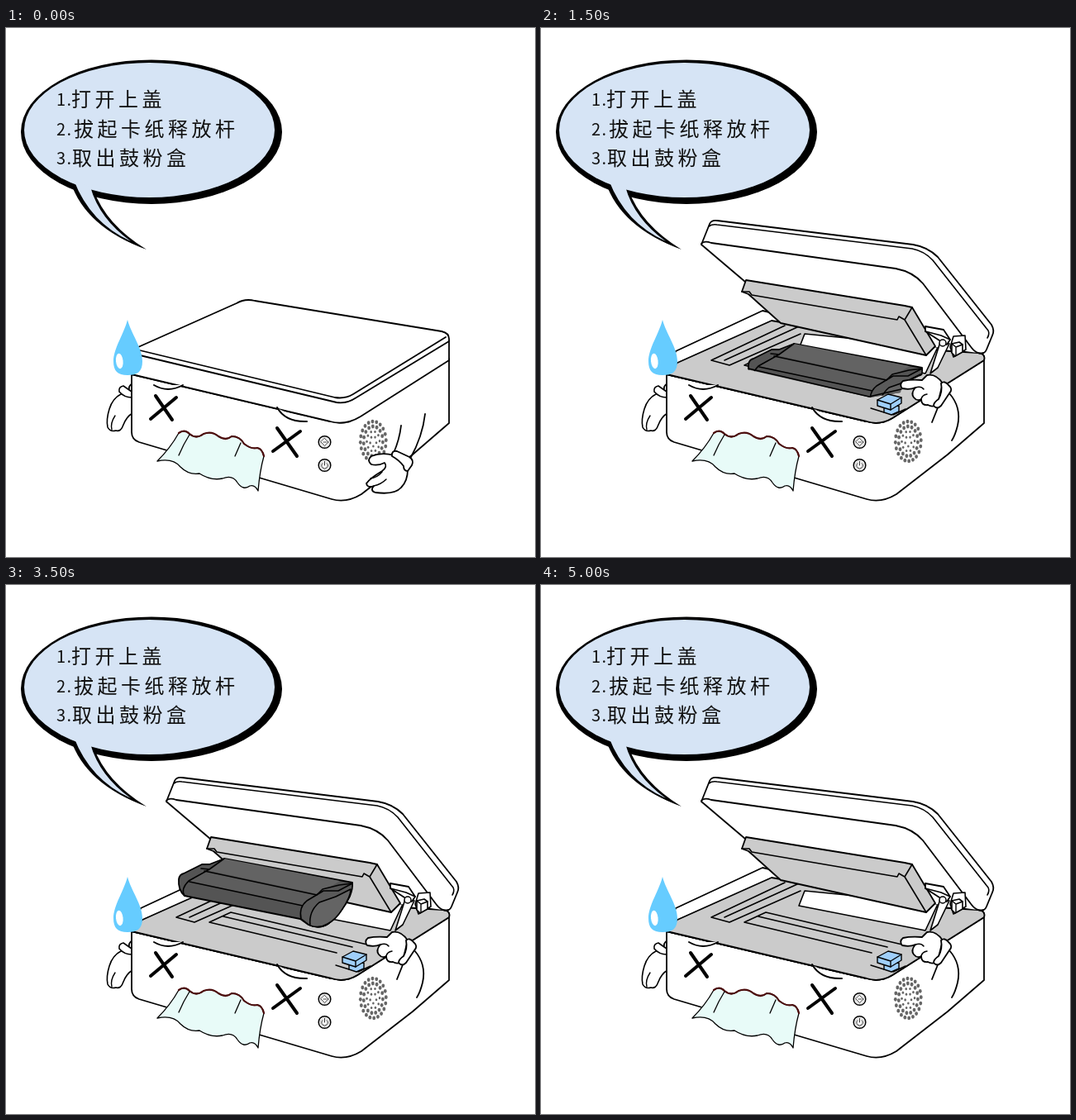
An HTML page with a canvas that plays this animation: 640x640 px, repeating every 7 s.

```html
<!DOCTYPE html>
<html lang="zh-CN">
<head>
<meta charset="utf-8">
<title>Printer help</title>
<style>
html, body { margin: 0; width: 100%; height: 100%; overflow: hidden; background: #fff; }
canvas { display: block; width: 100vw; height: 100vh; }
</style>
</head>
<body>
<canvas id="stage" width="640" height="640"></canvas>
<script>
const ctx = document.getElementById('stage').getContext('2d');
const INK = '#000', GREY = '#cbcbcb', BLUE = '#9fcffb', SKY = '#d6e4f5';
const LOOP = 7000, STEP = 500;

// Cartridge offset for each step from 3000 ms on; afterwards it is gone.
const LIFT = [[20, 24], [0, 0], [-40, -24], [-105, -51]];

function draw(d, fill, stroke = INK, width = 1.8) {
  const path = new Path2D(d);
  if (fill) { ctx.fillStyle = fill; ctx.fill(path); }
  if (stroke) { ctx.strokeStyle = stroke; ctx.lineWidth = width; ctx.stroke(path); }
}
const line = (d, width, color) => draw(d, null, color, width);

function oval(x, y, rx, ry, fill, stroke, width = 1.6, turn = 0) {
  ctx.beginPath();
  ctx.ellipse(x, y, rx, ry, turn, 0, Math.PI * 2);
  if (fill) { ctx.fillStyle = fill; ctx.fill(); }
  if (stroke) { ctx.strokeStyle = stroke; ctx.lineWidth = width; ctx.stroke(); }
}

function write(text, x, y, size, spacing) {
  ctx.font = `500 ${size}px "Noto Sans CJK SC", "Noto Sans CJK", sans-serif`;
  ctx.letterSpacing = spacing + 'px';
  ctx.fillText(text, x, y);
}

function bubble() {
  draw('M78 186Q96 241 170 268Q121 238 106 196Z', INK, null);
  oval(176, 125.7, 158, 87.3, INK);
  oval(173.5, 123.5, 151.5, 81.5, SKY);
  draw('M82 184Q102 236 151 258Q113 231 102 192Z', SKY, null);
  ctx.fillStyle = '#111';
  const rows = ['打开上盖', '拔起卡纸释放杆', '取出鼓粉盒'];
  rows.forEach((row, i) => {
    const y = 95 + i * 35.7;
    write(row, [79, 82, 80][i], y, 24, 4.5);
    write(i + 1 + '.', 61, y - 1, 20, 1.5);
  });
}

function drop() {
  draw('M147 353C151 369 165 387 165 403C165 416 159 420 147 420C135 420 130 415 130 403C130 388 143 369 147 353Z', '#66ccff', null);
  oval(137.3, 403, 4.3, 9.3, '#fff', null, 0, -0.1);
}

function leftArm() {
  line('M153 430Q148 433 149 437');
  draw('M153 466Q146 470 142 480Q139 489 133 487Q126 489 123 483Q121 474 125 461Q129 448 139 443L153 441Z', '#fff', INK, 1.6);
  draw('M137 440Q136 434 142 433L152 440V447Q143 447 137 440Z', '#fff', INK, 1.6);
  line('M132 469Q126 478 128 486', 1.4);
}

function body() {
  draw('M152 419V489Q152 498 161 501L394 570Q412 575 430 564L492 516L536 478V400L425 472Q410 481 394 476Z', '#fff');
}

function closedLid() {
  draw('M152 419L163 387L279 333Q289 327 301 330L527 367Q536 369 536 376V403L430 471Q413 481 395 477Z', '#fff', null);
  line('M152 419L392 476Q411 481 429 470L536 402');
  line('M160 386L279 333Q289 327 301 330L527 367Q536 369 536 376V403');
  line('M162 390L398 447Q410 449 420 443L532 374');
  line('M162 396L400 453Q412 455 424 447L536 379');
}

function face() {
  draw('M179 432Q196 442 214 432Z', '#fff', null);
  line('M179 432Q196 442 214 432', 2);
  draw('M328 460Q338 477 364 476L371 473Q352 472 328 460Z', '#fff', null);
  line('M328 459Q338 477 364 476', 2);
  line('M175 473L206 447M181 445L201 474', 4);
  line('M323 512L356 488M328 484L352 518', 4);
}

function paper() {
  const top = 'M209 490Q216 485 222 491Q230 498 239 491Q249 487 257 494Q266 500 273 494Q283 494 288 503Q297 510 304 508Q310 509 312 518';
  draw(top + 'Q307 536 305 560Q301 552 295 554Q287 560 280 550Q274 540 262 545Q248 548 234 539Q221 541 211 531Q202 520 183 524Q199 508 209 490Z', '#e8fbf8', INK, 1.3);
  line(top, 2.2, '#4d0d0d');
  line('M222 492Q215 503 209 517M284 502L277 518', 1.3);
}

function panel() {
  [501, 529].forEach(y => {
    oval(385.5, y, 7.3, 7.3, '#fff', INK, 1.5);
    oval(385.5, y, 5.2, 5.2, null, '#aaa', 0.6);
  });
  line('M385.5 496.5L390 501L385.5 505.5L381 501ZM384 501H388', 0.9, '#333');
  line('M383 526.5A3.7 3.7 0 1 0 388 526.5M385.5 524.5V529', 1, '#333');
  for (let ring = 1; ring <= 4; ring++) {
    const count = 5 * ring;
    for (let i = 0; i < count; i++) {
      const a = Math.PI * 2 * i / count + ring * 0.3;
      oval(444.3 + 15.5 * ring / 4 * Math.cos(a), 500 + 24 * ring / 4 * Math.sin(a),
        ring > 2 ? 1.9 : 1.3, ring > 2 ? 2.4 : 1.6, '#666');
    }
  }
}

function restingHand() {
  line('M478 481Q476 498 469 514M507 467Q504 494 489 521');
  draw('M469 517Q455 513 442 518Q436 523 442 528Q450 530 458 526Q462 531 455 536Q440 545 436 551Q437 557 445 554Q440 560 447 562Q470 565 478 556Q486 548 486 534Z', '#fff');
  draw('M467 518Q466 511 473 512L488 519Q494 523 491 529L486 536Q481 536 481 530Q476 523 467 518Z', '#fff');
  line('M445 554Q454 552 460 546M441 545Q449 544 455 537', 1.5);
}

function pointingHand() {
  line('M494 442Q509 459 504 481Q501 493 497 499M481 457Q477 467 473 477');
  draw('M486 430Q478 418 467 420L461 426Q447 425 438 427Q433 431 437 436Q446 438 453 435Q447 442 451 447Q455 452 460 449Q460 457 468 456Q475 460 480 454Z', '#fff');
  draw('M484 430Q488 426 493 432Q499 437 494 442L484 457Q479 462 475 457Q475 453 481 449Q486 440 484 430Z', '#fff');
  line('M453 435Q460 433 463 437M460 449Q461 444 467 443', 1.5);
}

function baseTop() {
  draw('M152 419L163 391L268 342L478 390L529 393Q538 394 536 402L425 472Q410 481 394 476Z', '#fff');
  draw('M152 419L165 405L279 354L478 390L529 393Q538 394 536 402L425 472Q410 481 394 476Z', GREY);
  line('M206 402L295 360M206 402L228 408M222 402L310 362M228 408L314 370', 1.6);
  draw('M319 370L312 388L465 418L480 386Z', '#fff', INK, 1.6);
  line('M246 408L272 396L437 435M263 401L419 438M246 408L400 445', 1.6);
}

function openLid() {
  draw('M194 261L204 237Q206 232 213 233L450 262Q468 265 480 277L545 359Q549 366 546 372L539 389Q536 396 528 393L478 386L247 307Z', '#fff', null);
  line('M247 307L194 262L204 237Q206 232 213 233L450 262Q468 265 480 277L545 359Q549 366 546 372L539 389Q536 396 528 393');
  line('M203 240Q207 237 213 238L449 267Q464 270 474 281L541 366Q543 370 540 375', 1.6);
  line('M194 261Q197 257 206 260L429 291Q450 295 462 309L521 387Q527 395 535 393', 1.8);
  draw('M248 305L440 336L449 338L477 385L466 396L290 357L251 322L243 319Z', GREY);
  line('M243 319L252 319L255 323L431 353L433 349L440 353L449 338M440 353L466 396', 1.6);
}

function hinge() {
  draw('M483 380L471 418L480 411L494 382Z', '#fff', INK, 1.6);
  draw('M465 361L487 365L495 377L491 383L482 378L465 367Z', '#fff', INK, 1.8);
  line('M465 367L484 372L495 377', 1.5);
  oval(486, 381, 4, 4, '#fff', INK, 1.5);
  draw('M499 373L513 372L514 389L499 398L495 386Z', '#fff', INK, 1.6);
  draw('M497 382L506 380L510 383V392L501 397L497 393Z', '#fff', INK, 1.6);
  line('M497 382L502 386L510 383M502 386V396', 1.4);
}

function lever(raised) {
  if (!raised) {
    line('M399 460L420 467L440 458', 1.4);
    draw('M406 461L421 452L437 456L421 466Z', BLUE, INK, 1.5);
    line('M410 463L424 455', 1);
    return;
  }
  line('M399 460L415 465M426 468L441 461', 1.4);
  draw('M415 458V465L424 468L433 464V457Z', BLUE, INK, 1.4);
  draw('M407 450L420 443L436 447V454L423 462L407 457Z', BLUE, INK, 1.4);
  line('M407 450L423 455L436 447M423 455V462', 1.4);
}

function cartridge(dx, dy) {
  ctx.save();
  ctx.translate(dx, dy);
  draw('M209 356Q210 350 215 349L237 338L246 338L264 331L419 360L417 372L391 409Q381 417 366 411L356 404L216 376Q208 369 209 356Z', '#545454');
  draw('M243 345L264 331L404 358L378 374Z', '#636363', null);
  draw('M222 358L238 346L375 375L361 388Z', '#5d5d5d', null);
  line('M222 359L359 388M216 376Q211 368 221 358L246 344M236 343L246 344L264 331M240 346L376 375', 1.6);
  draw('M357 404Q354 390 364 382L384 370L402 370L419 361Q420 367 416 377Q407 396 391 409Q380 417 366 411Z', '#5a5a5a', INK, 1.6);
  draw('M368 412Q366 395 379 384L399 377L417 368Q417 377 407 392Q399 405 389 410Q379 416 368 412Z', '#646464', INK, 1.6);
  line('M376 375L383 368L403 363L419 361', 1.5);
  ctx.restore();
}

function seatedCartridge() {
  ctx.save();
  ctx.clip(new Path2D('M249 370H463V419L436 431L435 441L398 447L249 413Z'));
  cartridge(42, 51);
  ctx.restore();
  line('M251 412L397 446L436 437M436 431L460 419', 1.6);
}

function arrow() {
  draw('M377 400L410 430L415 424L421 443L400 440L406 435L374 405Z', '#e60012', null);
}

function render(time) {
  const step = Math.floor(time % LOOP / STEP);
  ctx.fillStyle = '#fff';
  ctx.fillRect(0, 0, 640, 640);
  ctx.lineCap = ctx.lineJoin = 'round';
  bubble();
  leftArm();
  body();
  if (step === 0) {
    closedLid();
  } else {
    baseTop();
    openLid();
    hinge();
    if (step < 6) seatedCartridge();
    lever(step > 1);
  }
  face();
  paper();
  panel();
  drop();
  if (step === 0) restingHand();
  else pointingHand();
  const lift = LIFT[step - 6];
  if (lift) cartridge(...lift);
  if (step === 2 || step === 4) arrow();
}

const start = performance.now();
function tick() {
  render(performance.now() - start);
  requestAnimationFrame(tick);
}
tick();
</script>
</body>
</html>
```
